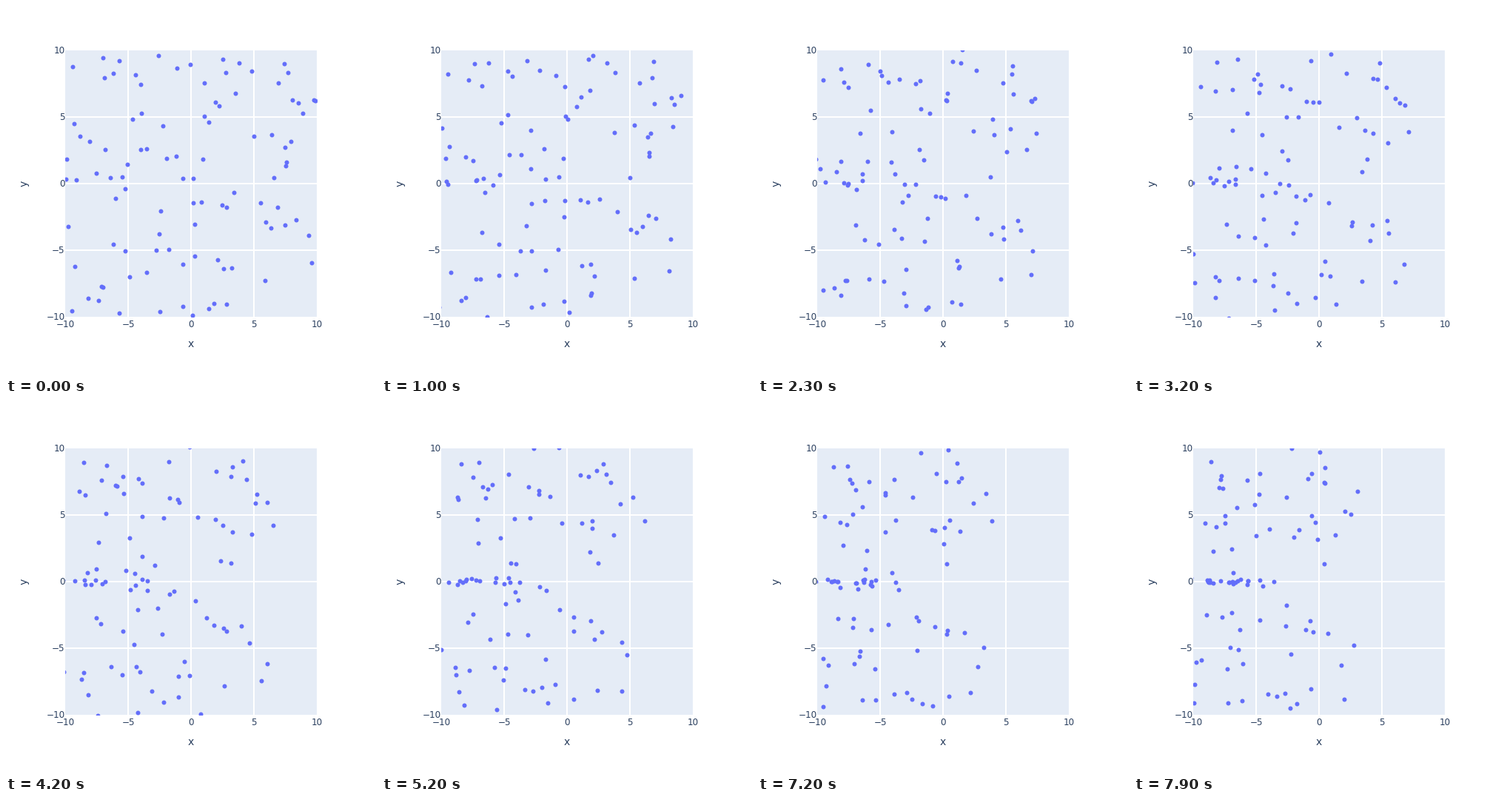
Recreate the animation shown at these times as a matplotlib script. Size 500 px wide and 500 px high, loop 8 s.

```python
import numpy as np
import matplotlib.pyplot as plt
from matplotlib.animation import FuncAnimation
from matplotlib.patches import Rectangle

SIZE, DPI = 500, 100
FRAMES, STEP = 80, 100
COUNT = 100
PX = 72 / DPI                      # one pixel in points
LEFT, TOP, WIDTH, HEIGHT = 80, 60, 340, 360
INK, DOT, PANEL = "#2a3f5f", "#636efa", "#e5ecf6"
TICKS = range(-10, 11, 5)


def to_px(x, y):
    return LEFT + (x + 10) * WIDTH / 20, TOP + (10 - y) * HEIGHT / 20


def drift(x, y):
    """Leftward stream: leaves y = 0 on the right, gathers there on the left."""
    vx = -0.9 * np.clip(1 + x / 12, 0.15, 1)
    vy = 0.8 * y / (1 + 0.6 * y**2) * np.tanh(x / 3)
    return vx, vy


def make_path():
    rng = np.random.default_rng(7)
    dt = STEP / 1000
    x, y = rng.uniform(-10, 10, (2, COUNT))
    path = []
    for _ in range(FRAMES):
        path.append(np.column_stack(to_px(x, y)))
        vx, vy = drift(x, y)
        nx, ny = rng.normal(0, 0.4 * dt**0.5, (2, COUNT))
        x = x + vx * dt + nx
        y = y + vy * dt + ny * np.minimum(1, 0.4 + np.abs(y) / 3)
    return path


def label(x, y, text, size=12, **kw):
    ax.text(x, y, text, fontsize=size * PX, color=INK,
            family="DejaVu Sans", **kw)


def grid_line(xs, ys):
    ax.plot(xs, ys, color="white", lw=2 * PX, solid_capstyle="butt", zorder=1)


fig = plt.figure(figsize=(SIZE / DPI, SIZE / DPI), dpi=DPI, facecolor="white")
ax = fig.add_axes([0, 0, 1, 1])
ax.set(xlim=(0, SIZE), ylim=(SIZE, 0))
ax.axis("off")

panel = Rectangle((LEFT, TOP), WIDTH, HEIGHT, fc=PANEL, lw=0, zorder=0)
ax.add_patch(panel)

for t in TICKS:
    px, py = to_px(t, t)
    name = str(t).replace("-", "\u2212")
    if abs(t) < 10:
        grid_line([px, px], [TOP, TOP + HEIGHT])
        grid_line([LEFT, LEFT + WIDTH], [py, py])
    label(px, 433.5, name, ha="center", va="baseline")
    label(79.5, py + 4, name, ha="right", va="baseline")

label(250, 461, "x", 14, ha="center", va="baseline")
label(25, 240, "y", 14, ha="center", va="center", rotation=90)

path = make_path()
dots = ax.scatter(*path[0].T, s=(6 * PX) ** 2, c=DOT, linewidths=0, zorder=2)
dots.set_clip_path(panel)


def update(i):
    dots.set_offsets(path[i])
    return [dots]


anim = FuncAnimation(fig, update, frames=FRAMES, interval=STEP,
                     repeat=True, repeat_delay=0)
plt.show()
```
